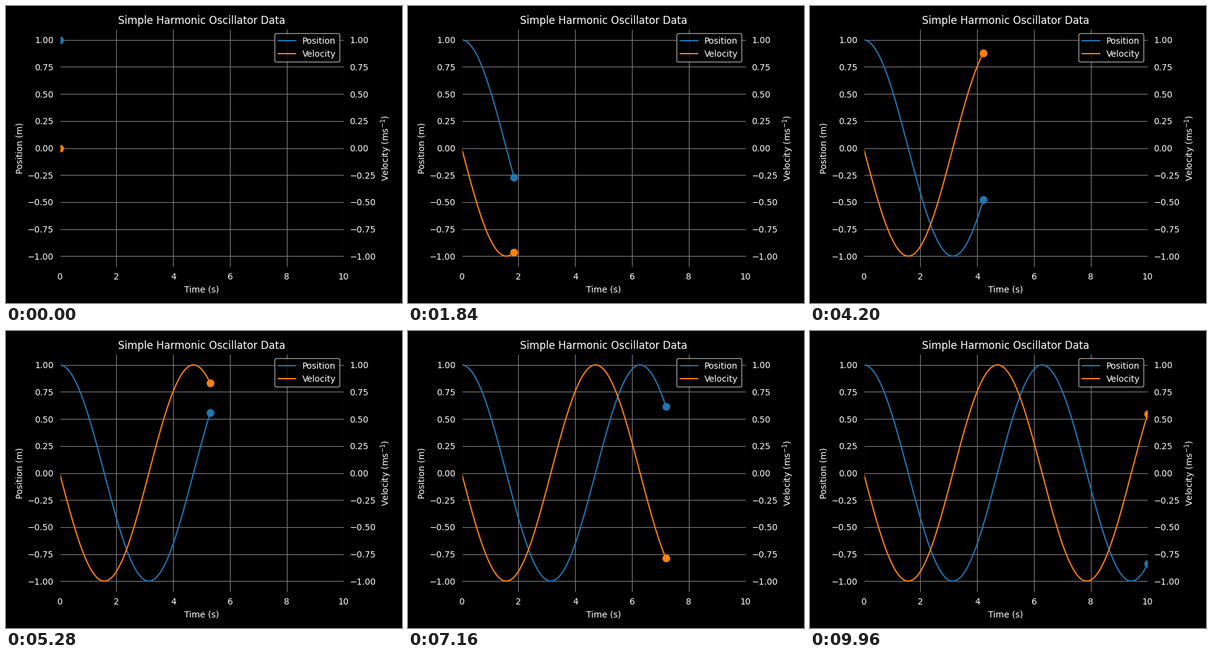
Animation, 640 px wide and 480 px high, one loop 10000 ms. Source, as a matplotlib script:

```python
import numpy as np
import matplotlib.pyplot as plt
from matplotlib.animation import FuncAnimation

FRAMES = 250
INTERVAL = 40

plt.style.use("dark_background")

time = np.linspace(0, 10, FRAMES)
position = np.cos(time)
velocity = -np.sin(time)

fig, ax = plt.subplots(figsize=(6.4, 4.8), dpi=100)
twin = ax.twinx()


def style_axes(axes, label):
    axes.set_xlim(0, 10)
    axes.set_ylim(-1.1, 1.1)
    axes.set_ylabel(label)
    axes.tick_params(color="black")
    for spine in axes.spines.values():
        spine.set_color("black")


def add_curve(axes, color, label):
    line, = axes.plot([], [], color=color, lw=1.5, label=label)
    dot, = axes.plot([], [], "o", color=color, ms=8)
    return line, dot


style_axes(ax, "Position (m)")
style_axes(twin, "Velocity (ms$^{-1}$)")
ax.set_xlabel("Time (s)")
ax.set_title("Simple Harmonic Oscillator Data")
ax.grid(color="gray")

pos_line, pos_dot = add_curve(ax, "tab:blue", "Position")
vel_line, vel_dot = add_curve(twin, "tab:orange", "Velocity")
twin.legend(handles=[pos_line, vel_line], loc="upper right")
fig.tight_layout()

curves = [(pos_line, pos_dot, position), (vel_line, vel_dot, velocity)]


def update(i):
    for line, dot, values in curves:
        line.set_data(time[:i + 1], values[:i + 1])
        dot.set_data([time[i]], [values[i]])
    return pos_line, pos_dot, vel_line, vel_dot


anim = FuncAnimation(fig, update, frames=FRAMES, interval=INTERVAL,
                     repeat=True, repeat_delay=0)
plt.show()
```
